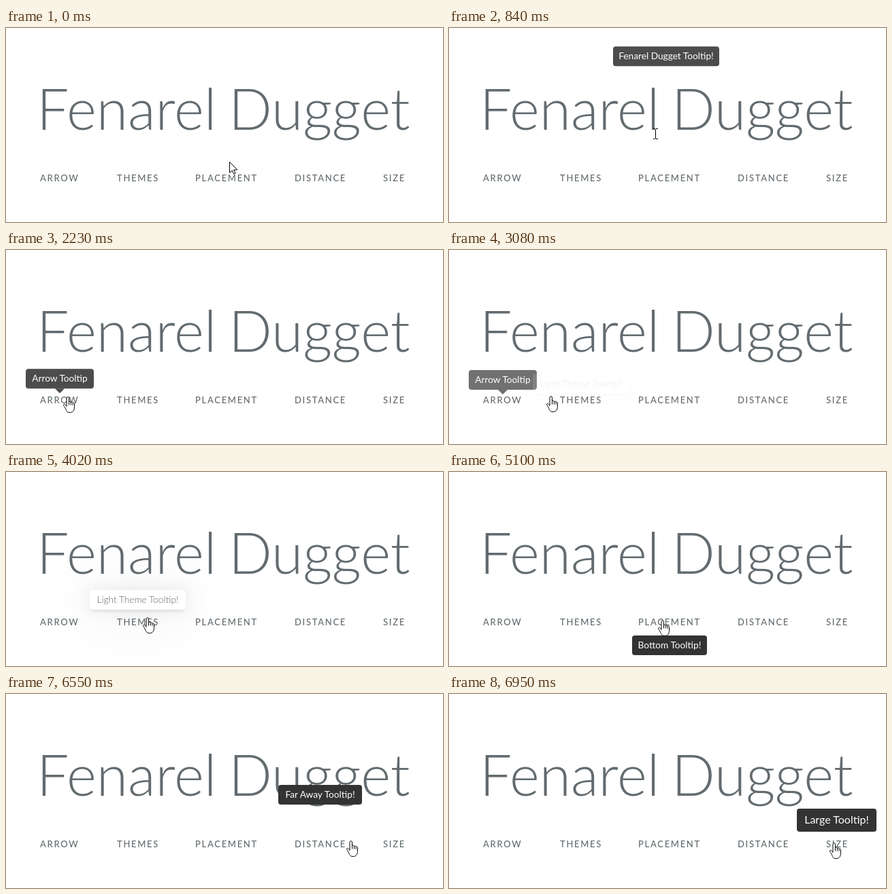
Recreate the animation shown at these times as an HTML page. Size 642 px wide and 286 px high, loop 7.64 s.

```html
<!DOCTYPE html>
<html lang="en">
<head>
<meta charset="utf-8">
<title>Tooltips</title>
<style>
  html, body { margin: 0; width: 100%; height: 100%; overflow: hidden; background: #fff; }
  svg { display: block; width: 642px; height: 286px; font-family: Lato, "Open Sans", sans-serif; }
  .title { font-size: 84px; font-weight: 300; fill: #636b6f; }
  .label { font-size: 13px; font-weight: 500; letter-spacing: 1.7px; fill: #636b6f; }
  .tip text { text-anchor: middle; fill: #fff; }
  .tip.light text { font-weight: 300; fill: #5c6166; }
  .cursor path { fill: #fff; stroke: #000; stroke-linejoin: round; }
  .cursor .line { fill: none; }
</style>
</head>
<body>
<svg viewBox="0 0 642 286">
  <text class="title" y="150"><tspan x="45">Fenarel</tspan><tspan x="327">Dugget</tspan></text>
  <g id="labels"></g>
  <g id="tips"></g>
  <g id="cursor" class="cursor">
    <g id="arrow">
      <path d="M.5.5v16l3.8-3.6 2.4 5.2 2.4-1.1-2.4-5h5.2z"/>
    </g>
    <g id="beam" transform="translate(-4 -8)">
      <path class="line" d="M0 .5h3M4 .5h3M3.5 1v14M0 15.5h3M4 15.5h3"/>
    </g>
    <g id="hand" transform="translate(-7 0)">
      <path d="M5 14.5V2.5a1.75 1.75 0 0 1 3.5 0V8.5c0-1.8 2.9-1.6 2.9.3c.3-1.4 2.7-1 2.7.6c.5-1 2.4-.5 2.4 1.2v5.2c0 4.6-2.4 7.7-6 7.7h-1.5c-3.4 0-4.6-3.2-5.9-6.4c-1-1.9-2.6-3.4-2.6-4.7c.3-1.8 2.4-1.2 3.5.8z"/>
      <path class="line" d="M8.5 8.5v4M11.4 9v3.5M14.1 9.8v3"/>
    </g>
  </g>
</svg>
<script>
const LOOP = 7640, STEP = 75, SHOW = 325, HIDE = 275;
const $ = id => document.getElementById(id);

function add(parent, tag, attrs, text) {
  const el = document.createElementNS("http://www.w3.org/2000/svg", tag);
  for (const k in attrs) el.setAttribute(k, attrs[k]);
  if (text) el.textContent = text;
  return parent.appendChild(el);
}

[["ARROW", 50], ["THEMES", 163], ["PLACEMENT", 278], ["DISTANCE", 424], ["SIZE", 554]]
  .forEach(([text, x]) => add($("labels"), "text", { class: "label", x, y: 226 }, text));

// from: vertical offset of the hidden state
const tips = [
  { text: "Fenarel Dugget Tooltip!", x: 241, y: 26, w: 156, show: 655, hide: 1850 },
  { text: "Arrow Tooltip", x: 29, y: 174, w: 100, show: 2055, hide: 3045, arrow: true },
  { text: "Light Theme Tooltip!", x: 123, y: 174, w: 141, show: 3065, hide: 4145, light: true },
  { text: "Bottom Tooltip!", x: 269, y: 241, w: 110, show: 4165, hide: 5285, from: -10 },
  { text: "Far Away Tooltip!", x: 400, y: 134, w: 123, show: 5305, hide: 6605 },
  { text: "Large Tooltip!", x: 511, y: 169, w: 117, h: 34, size: 16, show: 6625, hide: LOOP + 1 }
];

function shadow(g, w, h, dy, blur, spread, color) {
  add(g, "rect", {
    x: -spread, y: dy - spread, width: w + 2 * spread, height: h + 2 * spread,
    rx: 4, fill: color, style: `filter: blur(${blur / 2}px)`
  });
}

for (const tip of tips) {
  const { w, h = 29, size = 13.7 } = tip;
  const g = tip.el = add($("tips"), "g", { class: tip.light ? "tip light" : "tip" });
  if (tip.light) {
    shadow(g, w, h, 4, 80, -8, "rgba(36,40,47,.25)");
    shadow(g, w, h, 0, 20, 4, "rgba(154,161,177,.15)");
    shadow(g, w, h, 4, 4, -2, "rgba(91,94,105,.15)");
  }
  add(g, "rect", { width: w, height: h, rx: 4, fill: tip.light ? "#fff" : "#333" });
  if (tip.arrow) add(g, "path", { d: `M${w / 2 - 7} ${h}h14l-7 7z`, fill: "#333" });
  add(g, "text", { x: w / 2, y: h / 2 + size * 0.34, "font-size": size }, tip.text);
}

// Pointer hotspot: time, x, y
const path = [
  [0, 328, 197], [500, 328, 197], [930, 300, 150], [1500, 300, 150],
  [1830, 126, 176], [2190, 91, 216], [2930, 91, 216], [3230, 208, 214],
  [4020, 208, 214], [4350, 314, 218], [5100, 314, 218], [5500, 472, 214],
  [6320, 472, 214], [6860, 566, 219], [LOOP, 566, 219]
];

// Spans in which the picture changes, in steps
const spans = [[530, 980], [1530, 2230], [2230, 2380], [2930, 3390], [4020, 4490], [5100, 5630], [6320, 6950]];

const clamp = v => Math.min(1, Math.max(0, v));
const smooth = v => v * v * (3 - 2 * v);
const easeOut = v => 1 - (1 - v) ** 2.7;

function snap(t) {
  const span = spans.find(([a, b]) => t >= a && t < b);
  return span ? span[0] + Math.floor((t - span[0]) / STEP) * STEP : t;
}

function pointer(t) {
  const i = path.findIndex(p => p[0] > t);
  const [t0, x0, y0] = path[i - 1], [t1, x1, y1] = path[i];
  const k = smooth((t - t0) / (t1 - t0));
  return [x0 + (x1 - x0) * k, y0 + (y1 - y0) * k];
}

function draw(time) {
  const t = snap(time);
  for (const { el, x, y, show, hide, from = 10 } of tips) {
    const k = t < hide ? easeOut(clamp((t - show) / SHOW)) : 1 - easeOut(clamp((t - hide) / HIDE));
    el.style.display = k > 0 ? "" : "none";
    el.setAttribute("opacity", k);
    el.setAttribute("transform", `translate(${x} ${y + from * (1 - k)})`);
  }
  const [x, y] = pointer(t);
  const kind = y < 180 ? "beam" : y > 211 ? "hand" : "arrow";
  for (const id of ["arrow", "beam", "hand"]) $(id).style.display = id === kind ? "" : "none";
  $("cursor").setAttribute("transform", `translate(${Math.round(x)} ${Math.round(y)})`);
}

const start = performance.now();
function tick() {
  draw((performance.now() - start) % LOOP);
  requestAnimationFrame(tick);
}
tick();
</script>
</body>
</html>
```
